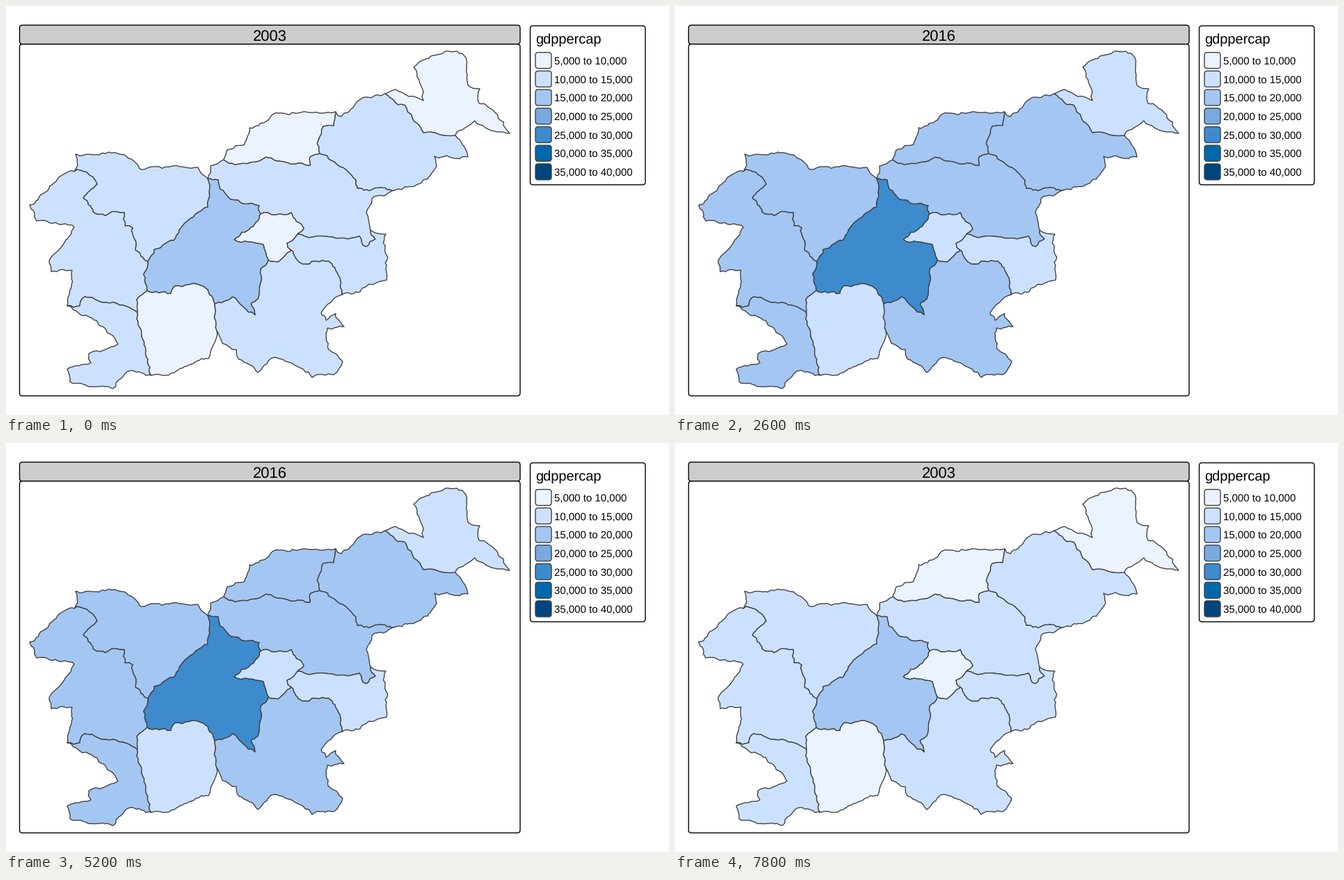
These frames come from a looping animation (953 by 588 pixels, 8000 ms). A matplotlib script:

```python
import math
import random

import matplotlib.pyplot as plt
import numpy as np
from matplotlib.animation import FuncAnimation
from matplotlib.patches import FancyBboxPatch, Polygon

W, H, DPI = 953, 588, 64
PT = 72 / DPI  # points per pixel
FIRST, LAST = 2003, 2022
GREY = "#404040"
BLUES = ["#EAF3FE", "#CCE1FF", "#A4C6F3", "#78A9E0", "#3D8BCD", "#0068AA", "#00457F"]

plt.rcParams["font.family"] = "Liberation Sans"
plt.rcParams["text.hinting"] = "none"
plt.rcParams["text.hinting_factor"] = 1
random.seed(4)

# Points where borders meet
NODES = dict(
    A=(98, 238), B=(290, 248), C=(313, 221), D=(474, 152), E=(451, 212),
    F=(545, 126), G=(646, 186), H=(558, 265), I=(524, 322), J=(419, 328),
    K=(410, 351), L=(377, 365), M=(366, 299), N=(300, 428), O=(203, 409),
    P=(204, 367), Q=(189, 441), R=(88, 431), S=(209, 531), T=(303, 467),
    U=(483, 415), W=(724, 183))
BORDERS = {}


def ragged(p, q):
    """Points after p up to q, bent by random midpoint displacement."""
    dx, dy = q[0] - p[0], q[1] - p[1]
    size = math.hypot(dx, dy)
    if size < 6:
        return [q]
    bend = max(-2.2, min(2.2, random.gauss(0, 0.1 * size))) / size
    mid = ((p[0] + q[0]) / 2 - dy * bend, (p[1] + q[1]) / 2 + dx * bend)
    return ragged(p, mid) + ragged(mid, q)


def border(ends, *turns):
    """Store the line between two nodes, led through its main turns."""
    line = [NODES[ends[0]]]
    for point in [*turns, NODES[ends[1]]]:
        line += ragged(line[-1], point)
    BORDERS[ends] = line


border("AB", (103, 229), (100, 213), (148, 210), (176, 219), (194, 235), (276, 232))
border("BC", (294, 230))
border("CD", (318, 207), (343, 199), (350, 175), (375, 165), (383, 156))
border("DE", (471, 172), (456, 173), (449, 193))
border("CE", (329, 228), (374, 217), (426, 226), (437, 229), (438, 216))
border("DF", (482, 159), (502, 141), (519, 131))
border("FW", (560, 120), (600, 136), (600, 124), (586, 88), (602, 77), (648, 65),
       (661, 74), (664, 114), (681, 119), (680, 140), (703, 153))
border("WG", (706, 181), (674, 165))
border("FG", (576, 147), (600, 182))
border("GH", (656, 199), (664, 217), (616, 216), (616, 235), (600, 250))
border("EH", (472, 224), (503, 250), (505, 262))
border("HI", (526, 277), (518, 297))
border("IJ", (531, 335), (518, 346), (508, 331))
border("BM", (305, 250), (323, 278), (364, 287))
border("MJ", (410, 297), (428, 320))
border("ML", (352, 318), (328, 336), (370, 343))
border("JK", (404, 341))
border("KL", (391, 368))
border("KU", (426, 371), (464, 367), (478, 388))
border("IU", (546, 328), (547, 394), (509, 411))
border("UT", (453, 441), (460, 452), (474, 442), (486, 461), (462, 463), (463, 493),
       (484, 511), (471, 530), (440, 534), (412, 514), (382, 506), (362, 527),
       (335, 508), (331, 494), (311, 485))
border("NT")
border("LN", (366, 378), (362, 421), (352, 428), (358, 444), (325, 418))
border("NO", (284, 403), (243, 402), (237, 413))
border("OQ", (188, 422))
border("QS", (195, 475), (204, 508))
border("ST", (242, 527), (291, 507))
border("OP", (198, 385))
border("PB", (213, 350), (244, 333), (257, 312), (290, 289))
border("AP", (116, 239), (131, 256), (111, 276), (125, 296), (170, 297), (171, 316),
       (182, 319), (186, 351))
border("AR", (76, 246), (34, 286), (44, 309), (98, 318), (62, 366), (65, 382),
       (95, 380))
border("RQ", (106, 431), (113, 418), (154, 426))
border("RS", (124, 449), (161, 486), (119, 500), (122, 513), (88, 522), (92, 540),
       (154, 550), (180, 524))

# Ring of nodes per region -> share of the national mean in the first and last year
REGIONS = dict(
    ABPA=(0.82, 0.88), APOQRA=(0.93, 0.88), RQSR=(1.03, 0.97), ONTSQO=(0.76, 0.70),
    BCEHIJMB=(0.90, 0.88), CDEC=(0.77, 0.80), DFGHED=(0.83, 0.82), FWGF=(0.69, 0.68),
    MJKLM=(0.70, 0.53), JIUKJ=(0.78, 0.75), KUTNLK=(0.93, 0.97), PBMLNOP=(1.44, 1.40))


def outline(ring):
    pts = []
    for a, b in zip(ring, ring[1:]):
        line = BORDERS[a + b] if a + b in BORDERS else BORDERS[b + a][::-1]
        pts += line[:-1]
    return pts


def national(year):
    """Mean income in thousands: boom, slump, recovery, dip, rise."""
    return np.interp(year, [2003, 2008, 2009, 2013, 2016, 2019, 2020, 2022],
                     [12.9, 18.8, 17.8, 17.7, 19.6, 23.2, 22.4, 27.0])


def color_in(shares, year):
    income = national(year) * np.interp(year, [FIRST, LAST], shares)
    return BLUES[int(income // 5) - 1]


fig = plt.figure(figsize=(W / DPI, H / DPI), dpi=DPI, facecolor="white")
ax = fig.add_axes([0, 0, 1, 1])
ax.set(xlim=(0, W), ylim=(H, 0))
ax.axis("off")


def box(x0, y0, x1, y1, fill, edge="black", r=4):
    ax.add_patch(FancyBboxPatch(
        (x0, y0), x1 - x0, y1 - y0, boxstyle=f"round,pad=0,rounding_size={r}",
        fc=fill, ec=edge, lw=1.4 * PT))


def label(x, y, s, px, ha="left"):
    return ax.text(x, y, s, size=px * PT, ha=ha, va="baseline", color="black")


box(19.5, 27.5, 739, 54.8, "#CCCCCC")
box(19.5, 54.8, 739, 560.5, "white")
box(753.5, 28.5, 919, 257, "white")
title = label(379.3, 49.5, "", 22.3, "center")
label(761, 54, "gdppercap", 20.2)
for i, blue in enumerate(BLUES):
    y = 78.2 + 26.7 * i
    box(761, y - 11.5, 784, y + 11.5, blue, GREY)
    low = 5 * (i + 1)
    label(788.5, y + 5.7, f"{low},000 to {low + 5},000", 15.4)

shapes = {ring: ax.add_patch(Polygon(outline(ring), ec=GREY, lw=1.35 * PT,
                                     joinstyle="round"))
          for ring in REGIONS}


def update(i):
    # Years run up, then back down
    span = LAST - FIRST
    year = FIRST + min(i, 2 * span + 1 - i)
    title.set_text(str(year))
    for ring, shares in REGIONS.items():
        shapes[ring].set_facecolor(color_in(shares, year))
    return [title, *shapes.values()]


anim = FuncAnimation(fig, update, frames=2 * (LAST - FIRST + 1), interval=200,
                     repeat=True, repeat_delay=0)
plt.show()
```
